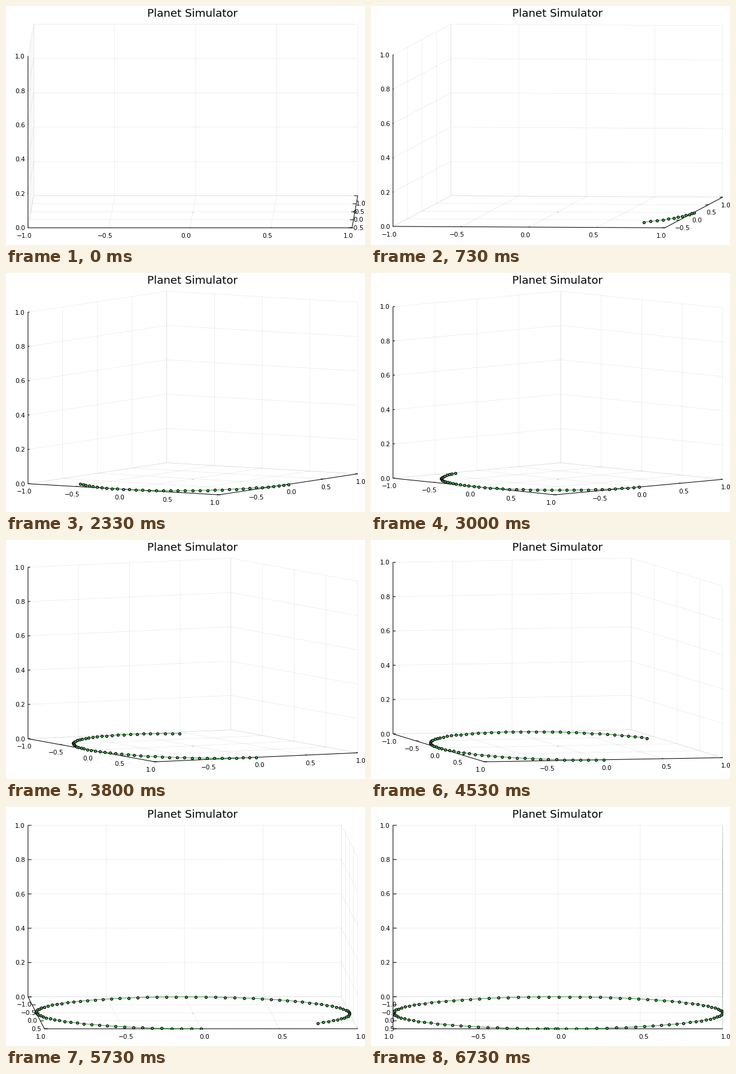
A matplotlib script that plays this animation: 600 px wide and 400 px high, repeating every 6790 ms.

```python
import numpy as np
import matplotlib.pyplot as plt
from matplotlib.animation import FuncAnimation
from matplotlib.collections import LineCollection
from matplotlib.patches import Rectangle

W, H, DPI = 600, 400, 100
STEPS, LOOP_MS = 102, 6790
SUB = 4                         # drawn frames per simulation step
LEFT, RIGHT, BOTTOM = 36.8, 587.8, 371.2
FLOOR, WALL = 53.6, 287.1       # screen heights of the floor and of the z axis
TURN = 0.06298                  # orbit angle per step, radians
TICK = 0.011                    # tick length as a share of the box side

plt.rcParams["font.family"] = "DejaVu Sans"


def pt(px):
    return px * 72 / DPI


fig = plt.figure(figsize=(W / DPI, H / DPI), dpi=DPI, facecolor="white")
ax = fig.add_axes([0, 0, 1, 1])
ax.set_xlim(0, W)
ax.set_ylim(H, 0)
ax.axis("off")


def project(x, y, z, az):
    """Map unit-box coordinates to the screen for a camera azimuth."""
    c, s = np.cos(az), np.sin(az)
    u = LEFT + (RIGHT - LEFT) * (c * x + s * y) / (c + s)
    v = BOTTOM - FLOOR * (s * s * (1 - x) + c * c * y) - WALL * z
    return u, v


def label(text):
    return ax.text(0, 0, text, fontsize=pt(10.55), ha="center", va="baseline")


def lines(width, alpha, order):
    group = LineCollection([], colors="black", linewidths=pt(width),
                           alpha=alpha, capstyle="butt", zorder=order)
    group.set_snap(False)
    ax.add_collection(group, autolim=False)
    return group


side = np.linspace(0, 1, 5)
rise = np.linspace(0, 1, 6)

grid_3d = []
for t in side:
    grid_3d += [((t, 0, 0), (t, 1, 0)), ((t, 1, 0), (t, 1, 1))]
    grid_3d += [((0, t, 1), (0, t, 0)), ((0, t, 0), (1, t, 0))]
for t in rise:
    grid_3d += [((0, 0, t), (0, 1, t)), ((0, 1, t), (1, 1, t))]

axes_3d = [((0, 0, 0), (0, 0, 1)), ((0, 0, 0), (1, 0, 0)), ((1, 0, 0), (1, 1, 0))]
axes_3d += [((0, 0, t), (0, TICK, t)) for t in rise]
axes_3d += [((t, 0, 0), (t, TICK, 0)) for t in side]
axes_3d += [((1, t, 0), (1 - TICK, t, 0)) for t in side]

grid = lines(0.6, 0.1, 1)
frame = lines(1, 1, 2)

# each label: text artist, box position, screen offset
labels = []
for t in side:
    name = f"{2 * t - 1:.1f}".replace("-", "\u2212")
    labels.append((label(name), (t, 0, 0), (-6.4, 12.9)))
    if t > 0:
        labels.append((label(name), (1, t, 0), (5.2, 12.9)))
for t in rise:
    labels.append((label(f"{t:.1f}"), (0, 0, t), (23.5 - LEFT, 0.2)))

ax.text(312, 17.8, "Planet Simulator", fontsize=pt(18.3),
        ha="center", va="baseline")

clip = Rectangle((37, 30), 551, 342, transform=ax.transData)
ax.add_patch(Rectangle((312, 345), 1, 1, color="#8a8a8a", lw=0, zorder=4))
trail, = ax.plot([], [], "-o", color="#3a9a3f", lw=pt(1), ms=pt(4.2),
                 mfc="#3da44d", mec="black", mew=pt(1), zorder=5)
trail.set_clip_path(clip)
trail.set_snap(False)


def segments(pairs, az):
    return [[project(*a, az), project(*b, az)] for a, b in pairs]


def draw(k):
    step = (k + 1) // SUB % STEPS
    az = np.radians(min(step + 1, 90))
    grid.set_segments(segments(grid_3d, az))
    frame.set_segments(segments(axes_3d, az))
    for text, pos, (dx, dy) in labels:
        u, v = project(*pos, az)
        text.set_position((u + dx, v + dy + 3.85))
    theta = TURN * np.arange(step + 1)
    x, y = (1 + np.cos(theta)) / 2, (1 - np.sin(theta)) / 2
    trail.set_data(*project(x, y, 0, az))
    return [grid, frame, trail]


anim = FuncAnimation(fig, draw, frames=STEPS * SUB,
                     interval=LOOP_MS / (STEPS * SUB),
                     repeat=True, repeat_delay=0, blit=False)
plt.show()
```
